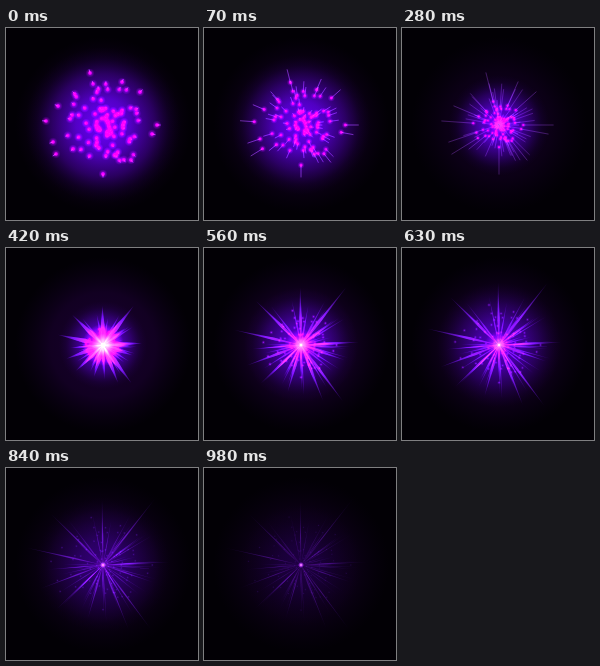
Recreate the animation shown at these times as an HTML page with a canvas. Size 192 by 192 pixels, loop 1.05 s.

```html
<!DOCTYPE html>
<html lang="en">
<head>
<meta charset="utf-8">
<title>Spark burst</title>
<style>
html, body { margin: 0; height: 100%; overflow: hidden; background: #020005; }
canvas { display: block; width: 100vw; height: 100vh; }
</style>
</head>
<body>
<canvas id="stage" width="192" height="192"></canvas>
<script>
const ctx = document.getElementById('stage').getContext('2d');
const LOOP = 1050, STEP = 70, BURST = 420, LAST = 980;
const CX = 97, CY = 97, TAU = Math.PI * 2;

let seed = 41;
const rnd = () => (seed = seed * 16807 % 2147483647) / 2147483647;
const mix = (a, b, u) => a + (b - a) * u;
const at = (a, r) => [CX + Math.cos(a) * r, CY + Math.sin(a) * r];

// Outer ends of the longest lines; the rest are scattered at random
const farSparks = [[84, 45], [116, 54], [134, 64], [52, 78], [40, 93], [47, 114], [50, 126],
                   [97, 146], [125, 132], [151, 97], [146, 106], [67, 121]];
const farRays = [[96, 32], [148, 32], [46, 47], [22, 80], [162, 94], [122, 160], [144, 160],
                 [36, 120], [52, 140], [82, 150], [146, 114], [134, 69]];

const polar = ([x, y]) => ({ a: Math.atan2(y - CY, x - CX), r: Math.hypot(x - CX, y - CY), k: 1 });
const scatter = (n, min, max, k) =>
  Array.from({ length: n }, () => ({ a: rnd() * TAU, r: mix(min, max, rnd()), k }));

const sparks = [...farSparks.map(polar), ...scatter(76, 5, 43, .85)];
const rays = [...farRays.map(polar), ...scatter(44, 22, 58, .55)];

function glow(x, y, r, alpha, stops) {
  const g = ctx.createRadialGradient(x, y, 0, x, y, r);
  stops.forEach(([p, rgb, k]) => g.addColorStop(p, `rgba(${rgb},${k * alpha})`));
  ctx.fillStyle = g;
  ctx.fillRect(x - r, y - r, 2 * r, 2 * r);
}

function trail(s, head, tail, alpha) {
  ctx.strokeStyle = `rgba(180,85,255,${alpha * s.k})`;
  ctx.lineWidth = .65;
  ctx.beginPath();
  ctx.moveTo(...at(s.a, s.r * head));
  ctx.lineTo(...at(s.a, s.r * tail));
  ctx.stroke();
}

function ray(s, reach, width, alpha) {
  const len = s.r * reach, tip = at(s.a, len), mid = at(s.a, len * .4);
  const nx = -Math.sin(s.a) * width * s.k, ny = Math.cos(s.a) * width * s.k;
  const g = ctx.createLinearGradient(CX, CY, ...tip);
  g.addColorStop(0, `rgba(180,40,255,${alpha * .4})`);
  g.addColorStop(.45, `rgba(145,40,255,${alpha * mix(.3, 1, s.k)})`);
  g.addColorStop(1, `rgba(95,20,220,${alpha * .3})`);
  ctx.fillStyle = g;
  ctx.beginPath();
  ctx.moveTo(CX, CY);
  ctx.lineTo(mid[0] + nx, mid[1] + ny);
  ctx.lineTo(...tip);
  ctx.lineTo(mid[0] - nx, mid[1] - ny);
  ctx.fill();
}

function draw(t) {
  const p = Math.min(1, t / BURST);                       // sparks fall inward
  const q = Math.max(0, (t - BURST) / (LAST - BURST));    // rays shoot out and fade
  const out = 1 - (1 - q) ** 3;
  const head = Math.exp(-1.2 * p) + .62 * out;

  ctx.globalCompositeOperation = 'source-over';
  ctx.fillStyle = '#020005';
  ctx.fillRect(0, 0, 192, 192);
  ctx.globalCompositeOperation = 'lighter';

  const wide = .42 + .16 * Math.cos(TAU * p) - .25 * q;
  glow(CX, CY, 88, wide, [[0, '42,0,80', 1], [.6, '34,0,62', .8], [1, '20,0,40', 0]]);
  const coreR = 44 + 34 * (1 - p) ** 1.5 + 24 * Math.sin(Math.PI * .75 * q);
  glow(CX, CY, coreR, .95 - .78 * q ** 1.3,
    [[0, '88,0,220', 1], [.35, '80,0,205', .8], [.65, '65,0,165', .42], [.85, '45,0,120', .13], [1, '30,0,80', 0]]);

  if (t >= BURST) {
    rays.forEach(s => ray(s, .6 + .42 * (1 - (1 - q) ** 4), mix(2.2, .5, Math.sqrt(q)), mix(.95, .3, q)));
  } else {
    sparks.forEach(s => trail(s, head, 1.07 - .3 * p ** 4, .85 - .6 * p));
  }

  // Sparks cool from magenta to violet after the burst
  const tint = `${mix(250, 120, out)},${mix(0, 40, out)},${mix(235, 255, out)}`;
  const size = mix(4.6, 2.4, Math.sqrt(p)) - 1.1 * q;
  const shine = mix(1, .75, p) - .6 * q;
  sparks.forEach(s => glow(...at(s.a, s.r * head), size, shine * s.k,
    [[0, tint, 1], [.28, tint, .75], [.5, tint, .28], [1, '150,0,255', 0]]));

  const flash = p ** 3 * (1 - q) ** 1.5;
  glow(CX, CY, 8 + 13 * flash, flash,
    [[0, '255,235,255', 1], [.25, '255,170,255', .9], [.55, '225,20,255', .55], [1, '150,0,255', 0]]);
  if (t >= BURST) {
    glow(CX, CY, 3, 1, [[0, '255,220,255', 1], [.35, '235,100,255', .7], [1, '170,40,255', 0]]);
  }
}

function tick(now) {
  draw(Math.floor(now % LOOP / STEP) * STEP);
  requestAnimationFrame(tick);
}
tick(performance.now());
</script>
</body>
</html>
```
